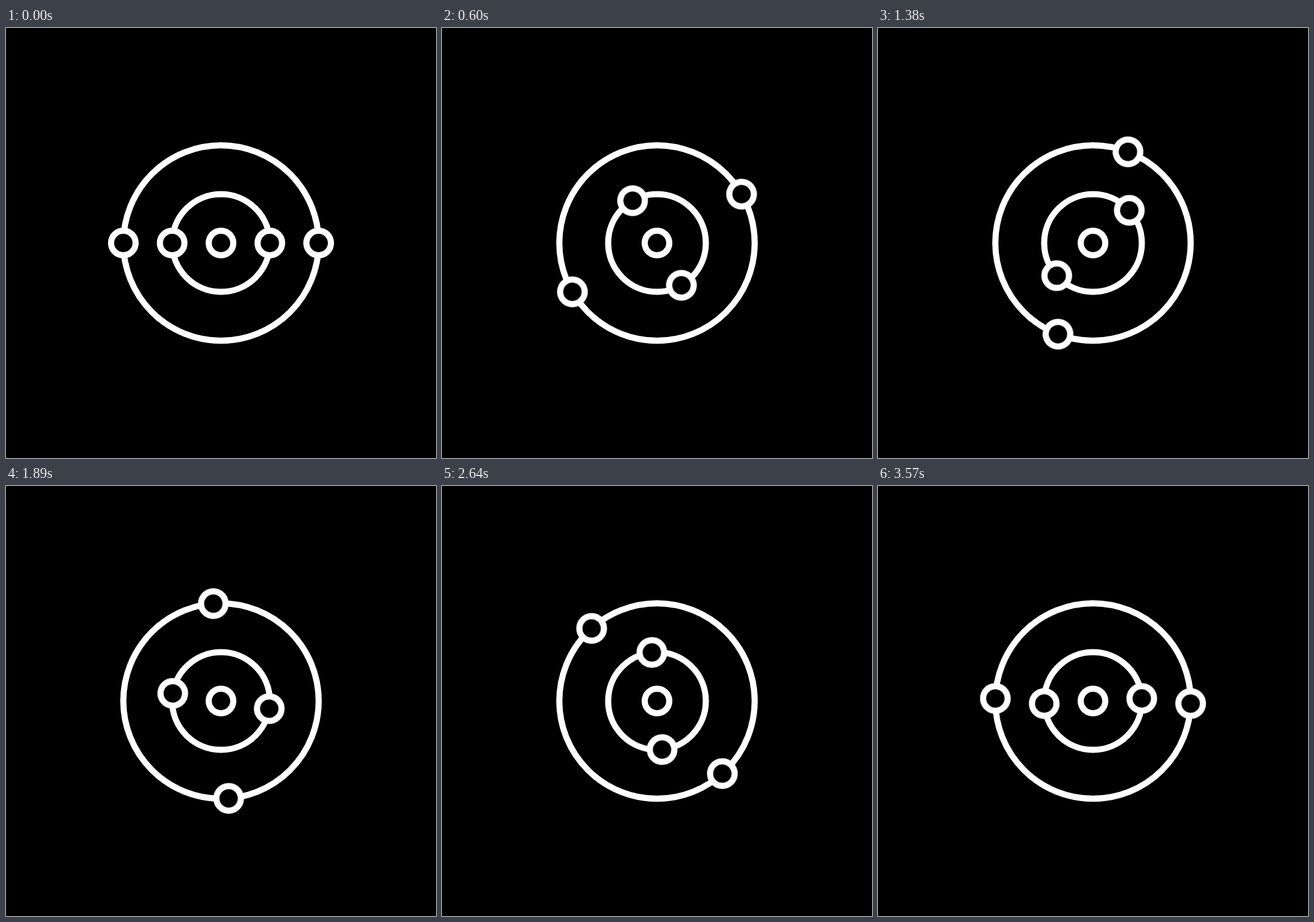
An HTML page for the animation above (3600 ms loop, 700 by 700 pixels).

```html
<!DOCTYPE html>
<html lang="en">
<head>
<meta charset="utf-8">
<title>Orbits</title>
<style>
  html, body { margin: 0; width: 100%; height: 100%; overflow: hidden; background: #000; }
  svg { display: block; width: 100%; height: 100%; }
  circle { fill: #000; stroke: #fff; stroke-width: 10; }
  .orbit { transform-origin: 0 0; animation: turn 3600ms steps(120) infinite; }
  @keyframes turn { to { transform: rotate(var(--sweep)); } }
</style>
</head>
<body>
<svg viewBox="-350 -350 700 700"></svg>
<script>
  // Each orbit carries two opposite dots; sweep is degrees per loop, clockwise positive.
  const orbits = [
    { radius: 159, sweep: -180 },
    { radius: 79.5, sweep: 360 }
  ];
  const DOT = 20;
  const svg = document.querySelector('svg');

  function add(parent, tag, attrs = {}) {
    const el = document.createElementNS(svg.namespaceURI, tag);
    for (const name in attrs) el.setAttribute(name, attrs[name]);
    return parent.appendChild(el);
  }

  for (const { radius } of orbits) add(svg, 'circle', { r: radius });

  for (const { radius, sweep } of orbits) {
    const group = add(svg, 'g', { class: 'orbit', style: `--sweep: ${sweep}deg` });
    for (const cx of [-radius, radius]) add(group, 'circle', { cx, r: DOT });
  }

  add(svg, 'circle', { r: DOT });
</script>
</body>
</html>
```
